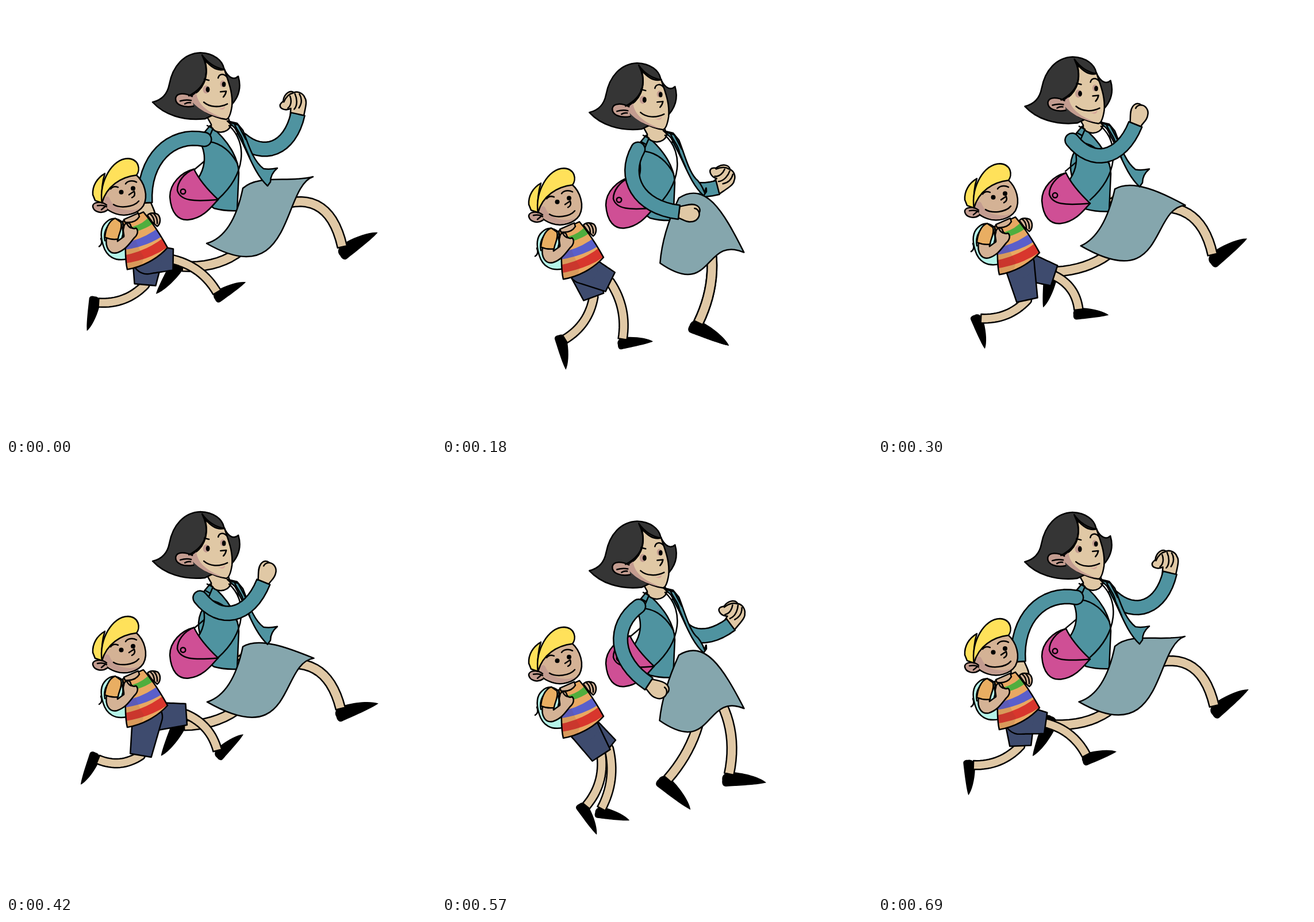
An HTML page for the animation above (720 ms loop, 748x748 px).

```html
<!DOCTYPE html>
<html lang="en">
<head>
<meta charset="utf-8">
<title>Running together</title>
<style>
html, body { margin: 0; width: 100%; height: 100%; overflow: hidden; background: #fff; }
svg { display: block; width: 100vw; height: 100vh; }
svg * { stroke-linejoin: round; stroke-linecap: round; }
.ink { stroke: #000; stroke-width: 2.5; }
.line { stroke: #000; stroke-width: 2.5; fill: none; }
.skin { fill: #e0c8a5; }
.boy { fill: #d4b295; }
.shade { fill: #c39c90; }
.teal { fill: #4f93a0; }
.hair { fill: #353535; }
.mint { fill: #b5f3e8; }
.cap { fill: #ffe15a; }
.pants { fill: #3e4b6e; }
.shirt { fill: #e8a862; }
</style>
</head>
<body>
<svg viewBox="0 0 748 748">
  <defs>
    <path id="foot" d="M-10 8C-11-2 0-4 8-2C26 1 44 8 51 15C40 17.5 8 17 -5 17C-10 17-11 12-10 8Z"/>
    <clipPath id="torso"><path d="M203 374L239 358C258 380 270 400 281 420C262 441 235 454 211 458C205 435 211 410 203 374Z"/></clipPath>
  </defs>

  <g id="farHand"><g transform="translate(-8 -20)">
    <path class="ink skin" d="M-5 22L-5 11C-14 17-25 13-24 6C-22 0-18 2-19-4C-17-14-9-21-2-17C8-21 16-14 18-9C23-4 20 10 18 26Z"/>
    <path class="line" d="M-18 1C-15-8-10-14-3-16M-10 11C-4 5-5-4-8-10M1 12C7 4 4-8 0-15M9 9C14 0 13-8 8-15"/>
  </g></g>
  <path id="farArm" class="ink teal"/>
  <use id="footB" href="#foot"/><path id="legB" class="ink skin"/>
  <use id="footA" href="#foot"/><path id="legA" class="ink skin"/>
  <g class="body">
    <path fill="#fff" d="M356 211L390 204L420 255L450 306L405 330Z"/>
    <path class="line" d="M326 286L345 270"/>
    <path class="ink teal" d="M355 208L345 220L341 244C348 262 346 282 334 300L345 340L362 352Q380 357 402 356L405 290C404 265 388 235 355 208Z"/>
  </g>
  <path id="skirt" class="ink" fill="#85a6ad"/>
  <g class="body">
    <path class="ink skin" d="M347 188L357 206L357 210C363 223 385 223 391 208L386 192Z"/>
    <path id="flap" class="ink teal"/>
    <path class="line" d="M391 203L404 207L417 232M398 207C405 222 411 225 413 238L424 264M350 208L360 213L352 232M346 219L355 224M354 236C375 239 392 254 403 275M388 208C420 237 418 292 369 336"/>
  </g>
  <g id="bag">
    <path class="ink" fill="#cf4f95" d="M327 283C305 288 285 308 285 331C287 360 300 373 318 371C345 368 360 345 369 336C352 320 336 302 327 283Z"/>
    <path class="line" d="M327 283C309 290 298 306 298 320C303 338 325 340 369 336"/>
    <circle class="line" cx="308" cy="322" r="4.3"/>
  </g>
  <g id="nearHand"><g transform="translate(18 0)">
    <path class="ink skin" d="M-18-10C-8-13 0-18 9-16C17-14 19-8 17-3C19 4 14 13 4 14C-5 16-10 11-18 10Z"/>
    <path class="line" d="M8-10Q14-10 17-3"/>
  </g></g>
  <path id="nearArm" class="ink teal"/>

  <g id="head">
    <path class="ink hair" d="M255 167C272 163 281 152 284 136C290 104 310 82 338 81C362 82 376 94 379 108C383 118 393 132 404 122C410 142 405 160 388 176L346 196C308 200 275 189 255 167Z"/>
    <path class="ink skin" d="M346 94C355 104 366 114 380 110C386 130 395 148 393 174C391 187 388 196 383 197C361 194 334 180 320 158C342 147 354 125 346 94Z"/>
    <path class="shade" d="M322 158L331 151C333 168 346 183 379 195C354 191 333 179 322 164Z"/>
    <ellipse class="shade" cx="348" cy="145" rx="5.5" ry="7"/>
    <ellipse class="shade" cx="377" cy="135" rx="4.5" ry="6"/>
    <path fill="#d6a69a" d="M366 177Q375 180 381 174Q381 180 375 180Z"/>
    <path class="ink shade" d="M324 157C312 151 297 150 295 160C294 172 310 177 326 174"/>
    <path class="line" d="M303 165Q313 162 322 164M311 170Q316 167 321 168M341 85C353 109 353 138 318 156M341 85C350 98 364 108 380 110M345 127L353 129M369 125C371 117 379 117 384 123M373 149L383 148Q382 154 378 158M344 167C354 176 371 177 385 170"/>
    <ellipse cx="351" cy="145" rx="3.4" ry="5"/>
    <ellipse cx="379" cy="136" rx="3.3" ry="4.6"/>
  </g>

  <use id="footQ" href="#foot"/><path id="legQ" class="ink skin"/><path id="shortQ" class="ink pants"/>
  <use id="footP" href="#foot"/><path id="legP" class="ink skin"/><path id="shortP" class="ink pants"/>
  <g id="kid">
    <circle class="pants" cx="246" cy="440" r="24.5"/>
    <path class="line" d="M165 404Q169 414 162 418"/>
    <path class="ink mint" d="M174 376C182 368 192 367 203 376L210 440C190 444 175 436 169 416C164 400 164 385 174 376Z"/>
    <path class="line" d="M180 379C172 388 170 398 172 408M200 380Q206 392 202 402"/>
    <path class="ink boy" d="M246 364C250 358 260 360 264 362C270 368 269 379 263 383L254 375Z"/>
    <path class="line" d="M250 361Q258 366 258 378M256 360Q264 367 263 378"/>
    <g clip-path="url(#torso)">
      <path class="shirt" d="M195 350H290V465H195Z"/>
      <path d="M220 384Q240 378 250 365L256 378Q244 387 226 392Z" fill="#4fae3e"/>
      <path d="M205 412Q240 405 264 386L272 400Q245 418 205 424Z" fill="#5a5fcb"/>
      <path d="M203 434Q245 426 275 402L284 417Q252 441 203 448Z" fill="#d8362d"/>
      <path d="M200 370L218 382Q228 420 240 436L234 460H200Z" fill="#6b4030" opacity=".13"/>
    </g>
    <path class="line" d="M203 374L239 358C258 380 270 400 281 420C262 441 235 454 211 458C205 435 211 410 203 374Z"/>
    <path class="ink boy" d="M205 371L207 376Q225 378 232 366L230 360Z"/>
    <path class="ink boy" d="M175 402C172 420 180 432 193 429C208 424 214 414 223 403C229 398 231 390 226 386C222 388 218 387 216 379C211 374 205 379 205 385C202 391 206 396 205 401L194 409L194 404Z"/>
    <path class="line" d="M210 378Q214 386 220 386"/>
    <path class="ink" fill="#e9ae62" d="M190 369C178 373 173 390 172 402Q184 407 195 405C196 395 203 387 200 376Z"/>
    <path class="ink boy" d="M226 293C241 306 248 330 239 347C230 361 208 367 191 361C173 355 166 345 168 335C176 312 195 297 226 293Z"/>
    <path class="shade" d="M170 334Q177 328 180 334C186 351 210 360 232 352C220 363 202 364 190 359C176 354 169 345 170 334Z"/>
    <path class="ink shade" d="M175 346C165 338 150 341 151 349C153 358 166 362 176 355"/>
    <path class="line" d="M159 347Q169 345 175 349M166 354L172 349M182 318C185 314 190 313 195 315M208 309C211 304 220 302 227 306M214 328L223 322Q226 330 219 333M187 345C198 352 222 350 231 339"/>
    <circle cx="200.500" cy="323.500" r="4"/><circle cx="221" cy="317" r="4"/>
    <path class="ink cap" d="M172 291C158 299 150 313 151 328L155 338L167 342Q165 312 172 291Z"/>
    <path class="ink cap" d="M167 342C161 306 185 265 212 265C232 266 234 285 227 294C200 297 175 313 167 342Z"/>
  </g>
</svg>
<script>
const LOOP = 720, STEP = 30;
const $ = id => document.getElementById(id);
const bodies = document.querySelectorAll('.body');
const cos = a => Math.cos(a * Math.PI / 180);
const sin = a => Math.sin(a * Math.PI / 180);
const mix = (a, b, u) => a.map((x, i) => x + (b[i] - x) * u);
const setD = (id, d) => $(id).setAttribute('d', d);
const move = (el, x, y, a = 0, s = 1) =>
  el.setAttribute('transform', `translate(${x} ${y}) rotate(${a}) scale(${s})`);

// One loop is two strides of 360 ms, so t reads as degrees of a stride
// and t / 2 as degrees of a full limb cycle.
const dip = (t, peak) => (.5 + .5 * cos(t - peak)) ** 2;

// Limb outline along a Bezier curve, round at the start
function tube(p, w0, w1 = w0) {
  const left = [], right = [], n = 16;
  for (let i = 0; i <= n; i++) {
    const u = i / n;
    let q = p;
    const halve = () => q.slice(1).map((b, j) => mix(q[j], b, u));
    while (q.length > 2) q = halve();
    const dx = q[1][0] - q[0][0], dy = q[1][1] - q[0][1];
    const [x, y] = halve()[0];
    const s = (w0 + (w1 - w0) * u) / (Math.hypot(dx, dy) || 1);
    const at = m => (x - dy * s * m).toFixed(2) + ' ' + (y + dx * s * m).toFixed(2);
    left.push(at(1));
    right.unshift(at(-1));
  }
  return `M${left.join('L')}L${right.join('L')}A${w0} ${w0} 0 0 0 ${left[0]}Z`;
}

// Middle of a to b, pushed sideways to the knee side
function knee(a, b, bulge) {
  const dx = b[0] - a[0], dy = b[1] - a[1], s = bulge / Math.hypot(dx, dy);
  return [(a[0] + b[0]) / 2 + dy * s, (a[1] + b[1]) / 2 - dx * s];
}

function leg(name, start, ankle, bulge, tilt, width, size) {
  setD('leg' + name, tube([start, knee(start, ankle, bulge), ankle], width));
  move($('foot' + name), ...ankle, tilt, size);
}

function womanLeg(name, t, drop) {
  const a = t / 2;
  const ankle = [446 + 157 * cos(a) - 18 * cos(3 * a), 436 - 17 * cos(a) + 116 * dip(t, 188)];
  const bulge = 58 + 12 * cos(a) + 20 * cos(t);
  const tilt = 30 - 78 * cos(a) + 9.5 * cos(t) + 10 * sin(t);
  leg(name, [455, 355 + drop], ankle, bulge, tilt, 8.3, 1.25);
}

function boyLeg(name, t, hip, thigh) {
  const a = t / 2, lag = a - 20, raise = 48 - 52 * cos(a - 25);
  const end = [hip[0] + thigh * cos(raise), hip[1] + thigh * sin(raise)];
  const ankle = [264 + 116 * cos(lag) - 12 * cos(3 * lag), 506 - 9 * cos(a) + 92 * dip(t, 218)];
  leg(name, end, ankle, 20, 30 - 66 * cos(a) - 42 * sin(a), 7.6, 1);
  setD('short' + name, tube([hip, mix(hip, end, .5), end], 26, 18.5));
}

// Rubber arm: the elbow always bows to the same side. Returns wrist and its heading.
function arm(name, shoulder, aim, reach, bow) {
  const at = (along, side) => [
    shoulder[0] + along * cos(aim) - side * sin(aim),
    shoulder[1] + along * sin(aim) + side * cos(aim)];
  const wrist = at(reach, 0), bend = at(.65 * reach, bow + 5);
  setD(name + 'Arm', tube([shoulder, at(.2 * reach, bow), bend, wrist], 12.3));
  return [wrist, Math.atan2(wrist[1] - bend[1], wrist[0] - bend[0]) * 180 / Math.PI];
}

// Skirt points: left tip, left bend, two top bends, right tip, two hem bends
const skirtHigh = [349,413, 395,400, 440,292, 490,308, 534,297, 480,315, 500,500];
const skirtLow = [349,413, 395,400, 440,300, 495,321, 536,338, 475,347, 505,502];
const skirtHung = [380,448, 383,395, 458,305, 488,355, 525,431, 455,400, 470,511];

function draw(t) {
  const a = t / 2, drop = 17 * dip(t, 185);
  const headDrop = 9.2 - 9.5 * cos(t - 20);
  const kidDrop = 8.8 - 10 * cos(t - 32);
  bodies.forEach(b => move(b, 0, drop));
  move($('bag'), 0, 8 - 8 * cos(t - 25));
  move($('head'), headDrop / 14, headDrop);
  move($('kid'), 0, kidDrop);

  womanLeg('A', t, drop);
  womanLeg('B', t + LOOP / 2, drop);

  const [near, nearTurn] = arm('near', [341 + 4 * cos(a), 232 + drop],
    57 + 82 * cos(a) - 6 * cos(3 * a), 131 + 20 * cos(a), 50);
  move($('nearHand'), ...near, nearTurn);
  const [far, farTurn] = arm('far', [400 + 9 * cos(a), 232 + drop],
    40 - 70 * cos(a) + 6 * cos(3 * a), 104 + 4 * cos(a), 46);
  move($('farHand'), ...far, .7 * (farTurn + 84));

  const s = mix(mix(skirtHigh, skirtLow, .5 - .5 * cos(a)), skirtHung, dip(t, 192));
  setD('skirt', `M${s[0]} ${s[1]}Q${s[2]} ${s[3]} 412 ${317 + drop}C${s.slice(4, 10)}C${s.slice(10)} ${s[0]} ${s[1]}Z`);

  // the loose jacket corner folds in at the lowest point
  const open = Math.max(0, Math.min(1, 2 - 3 * dip(t, 185)));
  setD('flap', `M385 200L402 204L412 216C420 235 428 268 ${441 + 7 * open} 283Q${450 + 8 * open} ${290 - 5 * open} ${457 + 15 * open} ${308 - 26 * open}Q460 292 460 306L455 313C430 290 420 250 398 212Z`);

  const hip = [246, 440 + kidDrop], thigh = 56 - 12 * cos(a - 20);
  boyLeg('Q', t + LOOP / 2, hip, thigh);
  boyLeg('P', t, hip, thigh);
}

function tick(now) {
  draw(Math.floor(now % LOOP / STEP) * STEP);
  requestAnimationFrame(tick);
}
draw(0);
requestAnimationFrame(tick);
</script>
</body>
</html>
```
